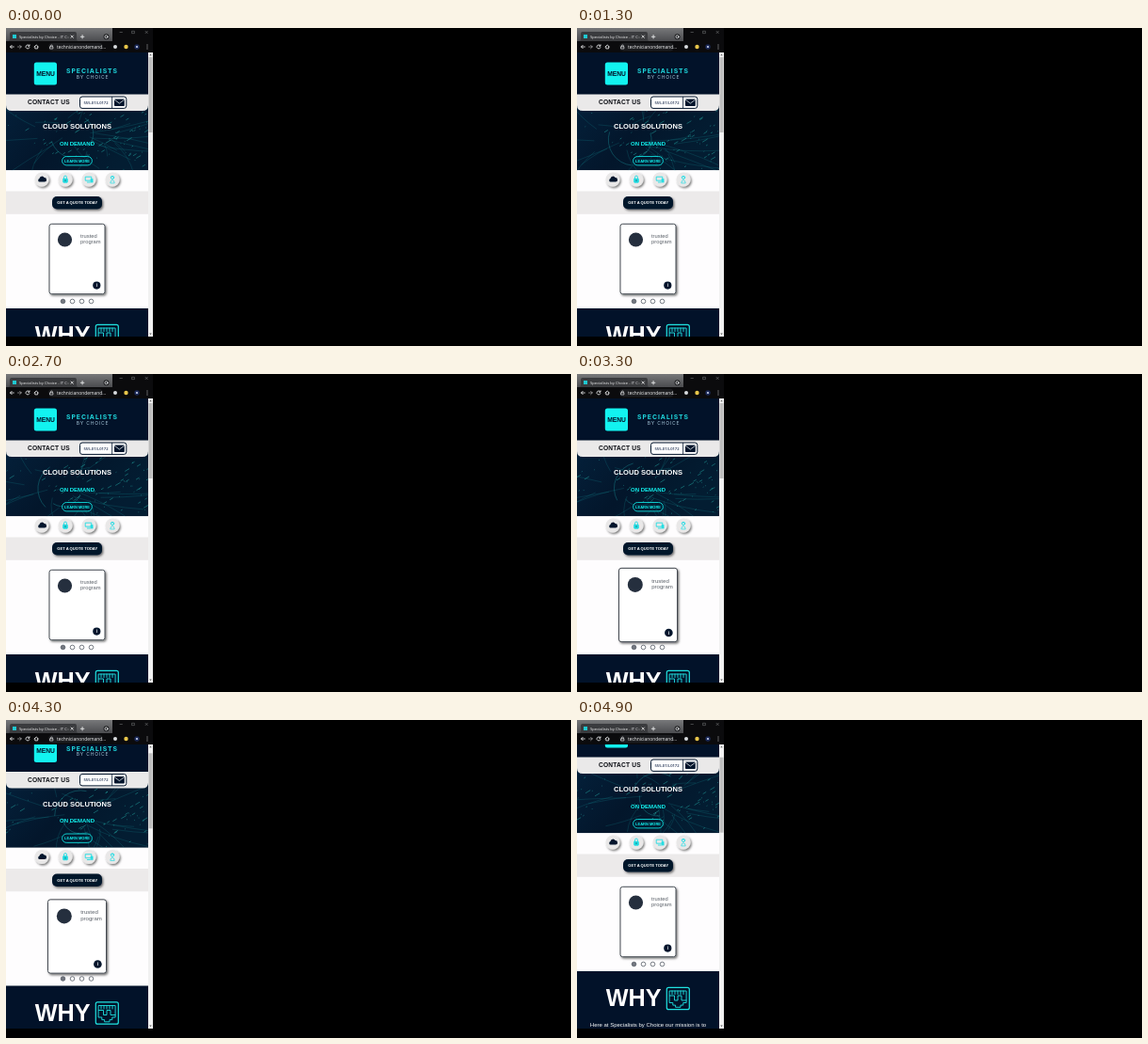
Write an HTML page that moves like this. It is 600 by 338 pixels and loops after 5000 ms.

```html
<!DOCTYPE html>
<html lang="en">
<head>
<meta charset="utf-8">
<title>Page scroll</title>
<style>
  html, body { margin: 0; height: 100%; overflow: hidden; background: #000; }
  svg { display: block; width: 100vw; height: 100vh; }
  text { font-family: "Liberation Sans", Arial, sans-serif; white-space: pre; }
  .b { font-weight: bold; }
  .m { text-anchor: middle; }
  .ui { font-family: "Open Sans", sans-serif; }
  .wide { font-family: Inter, sans-serif; }
  .line { fill: none; stroke-linecap: round; stroke-linejoin: round; }
</style>
</head>
<body>
<svg viewBox="0 0 600 338">
  <defs>
    <clipPath id="view"><path d="M0 26h151v302H0z"/></clipPath>
    <clipPath id="heroClip"><path d="M0 80h151v71.3H0z"/></clipPath>
    <linearGradient id="sky" x2="1" y2=".4">
      <stop offset="0" stop-color="#04203a"/><stop offset=".5" stop-color="#03162b"/><stop offset="1" stop-color="#031d32"/>
    </linearGradient>
    <linearGradient id="strip" x2="0" y2="1">
      <stop offset="0" stop-color="#77787a"/><stop offset="1" stop-color="#4b4c4f"/>
    </linearGradient>
    <filter id="shadow" x="-30%" y="-30%" width="170%" height="170%">
      <feDropShadow dx="1.3" dy="1.5" stdDeviation="1" flood-opacity=".55"/>
    </filter>
  </defs>
  <rect width="600" height="338"/>

  <g clip-path="url(#view)">
    <g id="page">
      <rect y="20" width="151" height="380" fill="#fefdfe"/>
      <rect y="20" width="151" height="68" fill="#021229"/>
      <rect x="29.8" y="36.5" width="24.2" height="24" rx="2.5" fill="#12f3f0"/>
      <text class="b m" x="42" y="50.8" font-size="6.7" fill="#021229">MENU</text>
      <text class="b m wide" x="91.5" y="48" font-size="6.8" letter-spacing="1" fill="#20dce2">SPECIALISTS</text>
      <text class="m wide" x="92" y="53.8" font-size="5" letter-spacing=".8" fill="#a9c9dc">BY CHOICE</text>

      <g clip-path="url(#heroClip)">
        <rect y="80" width="151" height="71.3" fill="url(#sky)"/>
        <path id="rays" class="line" stroke="#16a0a4" stroke-width=".5" opacity=".38"/>
        <path id="rings" class="line" stroke="#1fa3a8" stroke-width=".7" opacity=".5"/>
        <path id="specks" class="line" stroke="#2cc9bd" stroke-width=".8" opacity=".5"/>
      </g>
      <path d="M0 70.4h151v11.600q0 6-6 6H6q-6 0-6-6z" fill="#eae9e9"/>
      <text class="b" x="23" y="81.4" font-size="6.6" letter-spacing=".2" fill="#0a0c12">CONTACT US</text>
      <rect x="78.5" y="73" width="49.3" height="12.4" rx="2.5" fill="#fff" stroke="#03152c"/>
      <path d="M112.6 73v12.4" stroke="#03152c" stroke-width=".8"/>
      <text class="m ui" x="95.5" y="80.700" font-size="4.100" font-weight="600" fill="#17284a">555-013-0172</text>
      <rect x="115" y="75.5" width="10.8" height="7.5" rx=".8" fill="#03152c"/>
      <path class="line" d="M115.3 76.3l5.1 3.8 5.1-3.8" stroke="#fff" stroke-width=".7"/>

      <text class="b m" x="75.5" y="107.2" font-size="7.55" fill="#fff">CLOUD SOLUTIONS</text>
      <text class="b m" x="75.5" y="124.6" font-size="6" fill="#12f3f0">ON DEMAND</text>
      <rect x="59.6" y="136.5" width="31.8" height="9.4" rx="4.7" fill="#032036" fill-opacity=".5" stroke="#12f3f0" stroke-width=".8"/>
      <text class="b m" x="75.5" y="142.7" font-size="4" fill="#12f3f0">LEARN MORE</text>

      <g id="badges" filter="url(#shadow)" fill="#e9e8e8"></g>
      <path d="M35.6 163.600a1.800 1.800 0 0 1-.1-3.500 2.700 2.700 0 0 1 5.100-1 2.200 2.200 0 0 1 .4 4.500z" fill="#03152c"/>
      <g class="line" stroke="#20dce2" stroke-width=".9">
        <path d="M61.500 160v-1.400a1.500 1.500 0 0 1 3 0v1.400"/>
        <rect x="60.700" y="160.200" width="4.600" height="4" rx=".5" fill="#20dce2"/>
        <path d="M63 161.700v1" stroke="#176f80"/>
        <path d="M84.600 158.200h6.200v4h-6.200zM86.300 164h3" />
        <rect x="90.200" y="160.400" width="2" height="3.700" fill="#20dce2" stroke-width=".5"/>
        <circle cx="113" cy="159.200" r="1.500"/>
        <path d="M111 158.200q2-2.200 4 0M110.800 164.500q0-2.600 2.200-2.600t2.200 2.600z" stroke-width=".7"/>
      </g>

      <rect y="173.5" width="151" height="24.3" fill="#eceaea"/>
      <rect x="49" y="179" width="53" height="13.4" rx="5" fill="#03152c" filter="url(#shadow)"/>
      <text class="b m" x="75.7" y="187.2" font-size="4.1" fill="#fff">GET A QUOTE TODAY</text>

      <g id="card">
        <rect x="46" y="208.3" width="59" height="74.4" rx="2.5" fill="#fff" stroke="#353b43" stroke-width=".9" filter="url(#shadow)"/>
        <circle cx="62.5" cy="225" r="7.6" fill="#252f3e"/>
        <g font-size="5.8" fill="#5a6068"><text x="79" y="222.9">trusted</text><text x="79" y="229.3">program</text></g>
        <circle cx="96.3" cy="273.6" r="4.1" fill="#03152c"/>
        <text class="b m" x="96.3" y="275.2" font-size="4.5" fill="#fff">i</text>
      </g>
      <g id="dots" stroke="#555b65" stroke-width=".8"></g>

      <rect y="298" width="151" height="100" fill="#021229"/>
      <text class="b" x="30.800" y="335.100" font-size="25.200" fill="#fff">WHY</text>
      <g class="line" stroke="#20e4e2" stroke-width="1.2">
        <rect x="95.3" y="315.3" width="24" height="23.4" rx="2"/>
        <path d="M98.5 319h17.6v12.5h-3.3v2.6h-2.8v2.2h-5.4v-2.2h-2.8v-2.6h-3.3zM101 319v3.500m3-3.500v3.500m3-3.500v3.500m3-3.500v3.500m3-3.500v3.500M98.500 324h5v5h3.500v-5h4v5h5" stroke-width=".9"/>
      </g>
      <text class="m" x="75.5" y="357" font-size="6" fill="#fff">Here at Specialists by Choice our mission is to</text>
    </g>
  </g>

  <rect x="151" y="26" width="5" height="302" fill="#f1f1f1"/>
  <rect id="thumb" x="151.5" y="31" width="4" height="80" fill="#bdbdbd"/>
  <path d="M152.2 29.3l1.3-1.6 1.3 1.6zM152.2 324.5l1.3 1.6 1.3-1.6z" fill="#555"/>

  <rect width="156" height="26" fill="#0b0b0d"/>
  <rect width="113" height="14" fill="url(#strip)"/>
  <path d="M2 14q2 0 2-2V6q0-2 2-2h67q2 0 2 2v6q0 2 2 2z" fill="#3a3b3e"/>
  <rect x="45" y="15.8" width="58" height="8.6" rx="4.3" fill="#1b1c1f"/>
  <rect x="7" y="7" width="4" height="4" fill="#20c8d0"/>
  <text class="ui" x="14" y="10.9" font-size="4.2" fill="#f0f1f2">Specialists by Choice - IT Co</text>
  <rect x="65" y="5" width="3.5" height="8" fill="#3a3b3e" opacity=".7"/>
  <text class="ui" x="54" y="22" font-size="4.9" fill="#f4f5f6">technicianondemand...</text>
  <circle cx="106.5" cy="9.3" r="3" fill="#202124"/>
  <g class="line" stroke="#f4f5f6" stroke-width=".8">
    <path d="M69 8l2.4 2.4m0-2.4L69 10.4M79.3 9.3h3.6M81.1 7.5v3.6"/>
    <path d="M8.3 20H4.5m1.7-1.7L4.5 20l1.7 1.7"/>
    <path d="M12.5 20h3.8m-1.7-1.7 1.7 1.7-1.7 1.7" opacity=".6"/>
    <path d="M24.6 18.7a2 2 0 1 0 .3 2M25 17.8v1.4h-1.5"/>
    <path d="M30 20l2.2-2 2.2 2m-3.6-.4v2.3h2.8v-2.3"/>
    <path d="M47.4 19.8v-.8a1 1 0 0 1 2 0v.8m-2.5 0h3v2.200h-3z" stroke-width=".6"/>
    <circle cx="106.5" cy="9.3" r="1.5"/>
    <path d="M121 4.5h2.4M134 3.3h2.4v2.4H134zM148 3.3l2.4 2.4m0-2.4L148 5.7" stroke-width=".5" opacity=".5"/>
  </g>
  <circle cx="116" cy="20" r="2" fill="#d9dcdf"/>
  <circle cx="127.5" cy="20" r="2.2" fill="#e8c64a"/>
  <circle cx="139" cy="20" r="2.7" fill="#1c2a58"/>
  <circle cx="139" cy="20" r="1.1" fill="#cdd5ee"/>
  <path class="line" d="M150 18h.01m-.01 2h.01m-.01 2h.01" stroke="#f4f5f6" stroke-width=".9"/>
</svg>
<script>
const $ = id => document.getElementById(id);
const LOOP = 5000, STEP = 100;

$("badges").innerHTML = [38, 63, 88, 113].map(x => `<circle cx="${x}" cy="161" r="7.5"/>`).join("");
$("dots").innerHTML = [60.5, 70.5, 80.5, 90.5].map((x, i) =>
  `<circle cx="${x}" cy="290.5" r="2.3" fill="${i ? "#fff" : "#737780"}"/>`).join("");

let seed = 17;
const rnd = () => (seed = seed * 16807 % 2147483647) / 2147483647;
const rays = Array.from({length: 24}, () => ({a: rnd() * 6.28, r: 8 + rnd() * 25, len: 12 + rnd() * 50, bend: rnd() - .5}));
const specks = Array.from({length: 90}, () => ({x: 170 * Math.sqrt(rnd()), y: 82 + rnd() * 68, v: 2 + rnd() * 5, p: rnd() * 6.28, len: rnd() ** 3 * 5}));
const pt = (x, y) => x.toFixed(2) + " " + y.toFixed(2);

// Slowly turning fan of threads and rings, with drifting streaks
function drawHero(s) {
  const cx = 74 - 16 * Math.sin(s * .8), cy = 112 + 10 * Math.sin(s * .6);
  $("rays").setAttribute("d", rays.map(({a, r, len, bend}) => {
    const at = (k, turn) => pt(cx + Math.cos(a + s * .16 + turn) * k * 1.5, cy + Math.sin(a + s * .16 + turn) * k * .8);
    return `M${at(r, 0)}Q${at(r + len / 2, bend * .5)} ${at(r + len, bend)}`;
  }).join(""));
  $("rings").setAttribute("d", [19, 27].map((r, i) => {
    const a = s * .5 + i * 2 - 1, end = b => pt(cx + r * Math.cos(b), cy + r * Math.sin(b));
    return `M${end(a)}A${r} ${r} 0 0 1 ${end(a + 1.8)}`;
  }).join(""));
  $("specks").setAttribute("d", specks.map(({x, y, v, p, len}) =>
    `M${pt((x + v * s) % 170 - 10, y + 2 * Math.sin(s + p))}l${pt(len + .01, -len * .6)}`).join(""));
}

function ease(t, start, span) {
  const k = Math.min(1, Math.max(0, (t - start) / span));
  return k * k * (3 - 2 * k);
}

function draw(now) {
  const t = Math.floor(now % LOOP / STEP) * STEP;
  const scroll = 15.5 * (ease(t, 3900, 300) + ease(t, 4400, 300));
  const zoom = 1 + .052 * (ease(t, 3100, 200) - ease(t, 4700, 200));
  $("page").setAttribute("transform", `translate(0 ${-scroll})`);
  $("thumb").setAttribute("y", 31 + scroll * .28);
  $("card").setAttribute("transform", `translate(75.5 245.5) scale(${zoom}) translate(-75.5 -245.5)`);
  drawHero(t / 1000);
  requestAnimationFrame(draw);
}
draw(performance.now());
</script>
</body>
</html>
```
